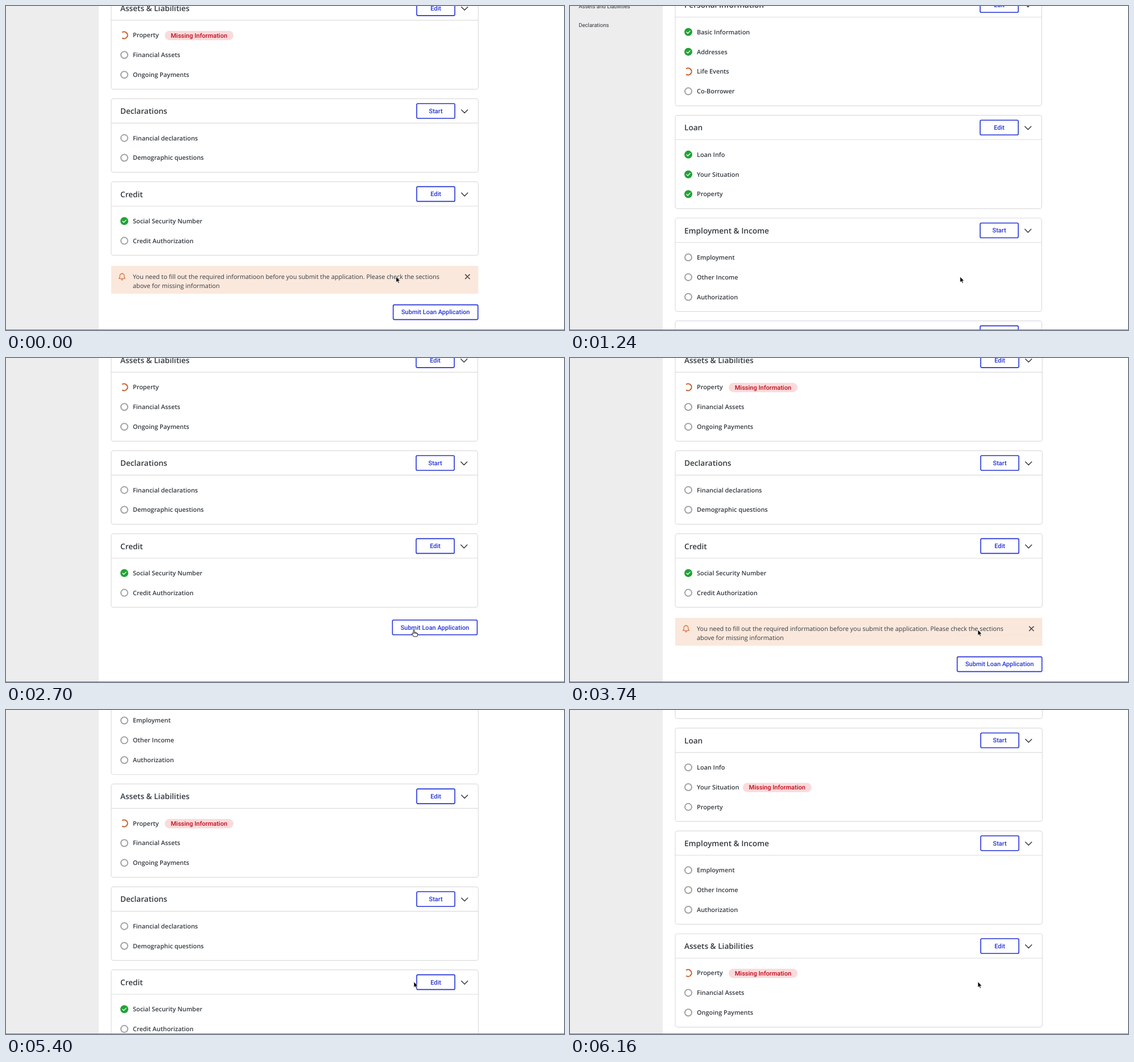
Recreate the animation shown at these times as an HTML page. Size 981x571 px, loop 7880 ms.

```html
<!DOCTYPE html>
<html lang="en">
<head>
<meta charset="utf-8">
<title>Loan application summary</title>
<style>
  html, body { margin: 0; width: 100%; height: 100%; overflow: hidden; background: #fff; }
  svg { display: block; width: 981px; height: 571px; }
  text { font: 600 10.9px "Open Sans", "Noto Sans", sans-serif; fill: #33393f; text-rendering: geometricPrecision; white-space: pre; }
  .hero { font-size: 16.38px; }
  .title { font-size: 13.62px; }
  .brand { font-size: 19.07px; fill: #4a4e57; }
  .plain { font-weight: 400; }
  .info { font: 400 10.96px Roboto, sans-serif; }
  .nav { font: 400 9.58px Roboto, sans-serif; }
  .here { font-weight: 700; fill: #1c1f24; }
  .btn { font: 500 11px Roboto, sans-serif; fill: #2433d6; text-anchor: middle; }
  .miss { font: 500 11px Roboto, sans-serif; fill: #bd0a1c; }
  .line { fill: none; stroke: #2f3439; stroke-width: 1.4; stroke-linecap: round; stroke-linejoin: round; }
</style>
</head>
<body>
<svg id="stage" viewBox="0 0 981 571">
  <g id="before"></g>
  <g id="after"></g>
  <g id="arrow">
    <path d="M0 0V10.2L2.3 8.1L3.9 11.6L5.6 10.8L4.1 7.4H7.2Z" fill="#000" stroke="#fff" stroke-width=".8"/>
  </g>
  <g id="hand">
    <path d="M-1.9 1.2V-4.6Q-1.9 -5.8 -.9 -5.8T.1 -4.6V-1.3Q1.9 -2.1 2.2 -.8Q3.8 -1.3 4.1 .1Q5.6 -.2 5.6 1.3V3Q5.6 4.6 4.7 6.2H-1.2Q-2.3 4.1 -4.2 1.9Q-5 .7 -4 .2T-1.9 1.2ZM.1 -1.3V1.2M2.2 -.8V1.4M4.1 .1V1.6"
      fill="#fff" stroke="#000" stroke-width=".9" stroke-linejoin="round"/>
  </g>
  <rect y="570" width="981" height="1" fill="#858585"/>
</svg>
<script>
const LOOP = 7880, TICK = 20, BOTTOM = 795.9;
const $ = id => document.getElementById(id);

const esc = s => s.replace(/&/g, '&amp;');
const text = (x, y, s, cls = '') => `<text x="${x}" y="${y}" class="${cls}">${esc(s)}</text>`;
const rect = (x, y, w, h, fill, extra = '') =>
  `<rect x="${x}" y="${y}" width="${w}" height="${h}" fill="${fill}" ${extra}/>`;
const line = (d, extra = '') => `<path class="line" d="${d}" ${extra}/>`;
const cross = (x, y) => line(`M${x - 3.8} ${y - 3.8}l7.6 7.6m0 -7.6l-7.6 7.6`);

const button = (cx, cy, w, label) =>
  rect(cx - w / 2, cy - 13, w, 26, '#fff', 'rx="2" stroke="#2433d6" stroke-width="1.6"') +
  text(cx, cy + 3.9, label, 'btn');

const icons = {
  done: y => `<circle cx="208" cy="${y}" r="7" fill="#22a238"/>` +
    line(`M204.9 ${y + .2}l2.2 2.2l4.1 -4.3`, 'style="stroke:#fff;stroke-width:1.3"'),
  todo: y => `<circle cx="208" cy="${y}" r="6" fill="none" stroke="#a2a2a2" stroke-width="2"/>`,
  part: y => `<path d="M204.2 ${y - 4.9}A6 6 0 1 1 204.2 ${y + 4.9}" fill="none" stroke="#c65a24" stroke-width="2"/>`
};

const badge = (x, y) =>
  rect(x, y - 8, 121, 16.4, '#fbdadb', 'rx="8.2"') + text(x + 10.7, y + 3.9, 'Missing Information', 'miss');

// Rows: [icon, label, badge x]
function card(top, width, name, action, rows) {
  const shift = width - 644.3, mid = top + 22, h = 60 + 34.85 * rows.length;
  return rect(185, top, width, h, '#fff', 'rx="4" stroke="#dcdcdc" stroke-width="1.2"') +
    `<path d="M185 ${top + 43}h${width}" stroke="#dcdcdc" stroke-width="1.1"/>` +
    text(201, mid + 4.9, name, 'title') +
    button(754.6 + shift, mid - .3, 67, action) +
    line(`M${799.7 + shift} ${mid - 2.4}l5.5 5.6l5.5 -5.6`) +
    rows.map(([icon, label, bx], i) => {
      const y = top + 69.3 + 34.85 * i;
      return icons[icon](y) + text(223, y + 3.9, label) + (bx ? badge(bx, y + .4) : '');
    }).join('');
}

function chrome() {
  const nav = ['Personal Information', 'Loan', 'Employment & Income', 'Assets and Liabilities', 'Declarations'];
  return rect(0, 0, 981, 1500, '#fff') + rect(0, 43, 163, 1457, '#ededed') +
    rect(0, 42, 981, 1, '#dadada') +
    line('M15.3 15.8h10.9m-10.9 4.5h10.9m-10.9 4.5h10.9') +
    rect(415.5, 10, 17.5, 17.5, '#3346e8') + text(437, 26, 'Tilfaro Lender', 'brand') +
    line('M920 14.5c-2.8 0 -5 1.8 -5 4.1c0 1.2 .5 2 1.2 2.8l-1 2.2l3 -1.1c4 .8 7.2 -1 7.2 -3.9c0 -2.3 -2.4 -4.1 -5.4 -4.1ZM926.8 17.3c2 .5 3.3 1.9 3.3 3.7c0 1.1 -.5 2 -1.2 2.8l1 2.2l-3 -1.1c-2.6 .4 -4.7 0 -6 -1.6') +
    line('M953 15.4h-2.2q-2 0 -2 2v5.4q0 2 2 2h2.2M953 20.1h8.8m-3.6 -4l4 4l-4 4') +
    rect(0, 43, 2, 33, '#2f40dd') +
    text(10, 63.3, 'Summary', 'nav here') + text(10, 95.9, 'Borrower', 'nav') +
    line('M146.4 91.2l2.9 -2.9l2.9 2.9', 'style="stroke-width:1.1"') +
    nav.map((s, i) => text(15.2, 128.8 + 32.8 * i, s, 'nav')).join('') +
    text(185, 82.8, 'Hi Hana! Here is a summary of information needed for your loan app', 'hero') +
    rect(185, 99.5, 709.5, 83, '#e8f0fb') +
    '<circle cx="204" cy="118.3" r="7" fill="none" stroke="#2c66d4" stroke-width="1.2"/>' +
    line('M202.6 117.4h1.6v4.2m-1.8 0h3.6M204 114.6v.3', 'style="stroke:#2c66d4;stroke-width:1.2"') +
    text(223, 123.4, 'Please review any pre-filled data and complete the remaining information for your loan application.') +
    text(223, 147.2, 'Upon receiving your full application with authorization to pull credit, we may be able to conditionally approve your request within', 'info') +
    text(223, 163.6, 'seconds of submission.', 'info') + cross(875.4, 118.8);
}

const bell = (x, y) => line(
  `M${x - 5.4} ${y + 3.3}q1.6 -1.6 1.6 -4.6q0 -3.9 3.8 -4.1q3.8 .2 3.8 4.1q0 3 1.6 4.6ZM${x - 1.5} ${y + 5}q1.5 1.4 3 0M${x} ${y - 6.3}v.8`,
  'style="stroke:#d2622a;stroke-width:1.1"');

function page(missing) {
  const w = missing ? 645.3 : 644.3, m = x => missing ? x : 0;
  const loan = missing ? 'todo' : 'done';
  const cards = [
    ['Personal Information', 'Edit', [['done', 'Basic Information'], ['done', 'Addresses'], ['part', 'Life Events'], ['todo', 'Co-Borrower']]],
    ['Loan', missing ? 'Start' : 'Edit', [[loan, 'Loan Info'], [loan, 'Your Situation', m(303.8)], [loan, 'Property']]],
    ['Employment & Income', 'Start', [['todo', 'Employment'], ['todo', 'Other Income'], ['todo', 'Authorization']]],
    ['Assets & Liabilities', 'Edit', [['part', 'Property', m(279)], ['todo', 'Financial Assets'], ['todo', 'Ongoing Payments']]],
    ['Declarations', 'Start', [['todo', 'Financial declarations'], ['todo', 'Demographic questions']]],
    ['Credit', 'Edit', [['done', 'Social Security Number'], ['todo', 'Credit Authorization']]]
  ];
  let out = chrome(), top = 199.6;
  for (const [name, action, rows] of cards) {
    out += card(top, w, name, action, rows);
    top += 76.65 + 34.85 * rows.length;
  }
  if (!missing) return out + button(753.9, BOTTOM + 474.8, 149, 'Submit Loan Application');
  return out + rect(185, BOTTOM + 458, 645.3, 49, '#fbe8dc') + bell(204, BOTTOM + 477) +
    text(223, BOTTOM + 480.9, 'You need to fill out the required informatioon before you submit the application. Please check the sections', 'plain') +
    text(223, BOTTOM + 497.2, 'above for missing information', 'plain') + cross(811.3, BOTTOM + 477) +
    button(755.2, BOTTOM + 539.6, 149, 'Submit Loan Application');
}

// Steps: [start, end, from, to, softness of the ease]
const tracks = {
  scroll: [[20, 910, BOTTOM, 0, .5], [944, 2000, 0, BOTTOM, 0], [4940, 6160, BOTTOM, 383.8, .3]],
  fade: [[10, 320, 1, 0, 1], [3420, 3760, 0, 1, 1]],
  x: [[2490, 2700, 685.8, 717, 1]],
  y: [[2490, 2700, 477, 478.8, 1]]
};

function at(steps, t) {
  let v = steps[0][2];
  for (const [a, b, from, to, soft] of steps) {
    if (t < a) break;
    const p = Math.min(1, (t - a) / (b - a));
    v = from + (to - from) * (p + soft * (p * p * (3 - 2 * p) - p));
  }
  return v;
}

$('before').innerHTML = page(false);
$('after').innerHTML = page(true);

const start = performance.now();
function draw() {
  const t = Math.floor((performance.now() - start) % LOOP / TICK) * TICK;
  const move = `translate(0 ${-at(tracks.scroll, t)})`;
  const fade = at(tracks.fade, t);
  const x = at(tracks.x, t), y = at(tracks.y, t);
  const hand = t >= 2500 && t < 3600;
  $('before').setAttribute('transform', move);
  $('after').setAttribute('transform', move);
  $('after').setAttribute('opacity', fade);
  $('after').style.display = fade ? '' : 'none';
  $('arrow').setAttribute('transform', `translate(${x} ${y})`);
  $('hand').setAttribute('transform', `translate(${x + 1} ${y + 6})`);
  $('arrow').style.display = hand ? 'none' : '';
  $('hand').style.display = hand ? '' : 'none';
  requestAnimationFrame(draw);
}
draw();
</script>
</body>
</html>
```
